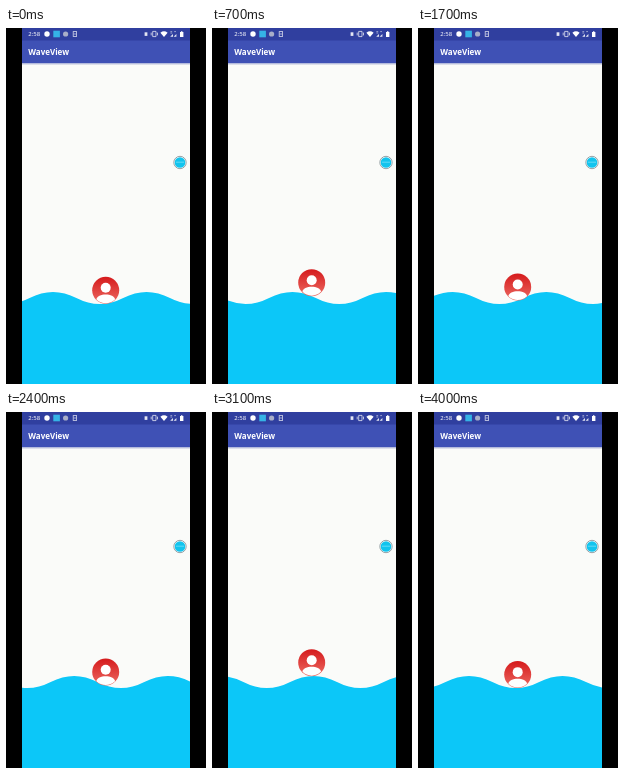
An HTML page that plays this animation: 200 px wide and 356 px high, repeating every 4.1 s.

```html
<!DOCTYPE html>
<html lang="en">
<head>
<meta charset="utf-8">
<title>WaveView</title>
<style>
  html, body { margin: 0; width: 100%; height: 100%; overflow: hidden; background: #000; }
  svg { display: block; width: 100%; height: 100%; }
  text { font-family: "Noto Sans", "Open Sans", sans-serif; fill: #fff; }
</style>
</head>
<body>
<svg viewBox="0 0 200 356">
  <defs>
    <linearGradient id="red" x1="0" y1="0" x2="0" y2="1">
      <stop offset="0" stop-color="#d51a1c"/>
      <stop offset="1" stop-color="#ec6a62"/>
    </linearGradient>
    <linearGradient id="shade" x1="0" y1="0" x2="0" y2="1">
      <stop offset="0" stop-color="#3f51b5" stop-opacity=".5"/>
      <stop offset="1" stop-color="#8088a8" stop-opacity="0"/>
    </linearGradient>
    <clipPath id="disc"><circle r="13"/></clipPath>
    <clipPath id="screen"><rect x="16" width="168" height="356"/></clipPath>
  </defs>

  <rect width="200" height="356"/>
  <g clip-path="url(#screen)">
    <rect x="16" width="168" height="356" fill="#fafbf9"/>
    <rect x="16" y="35" width="168" height="2.5" fill="url(#shade)"/>
    <rect x="16" y="12" width="168" height="23" fill="#3f51b5"/>
    <rect x="16" width="168" height="12.5" fill="#303f9f"/>
    <path id="wave" fill="#0cc7f8"/>
    <g id="avatar">
      <circle r="13.5" fill="url(#red)"/>
      <g clip-path="url(#disc)" fill="#fff">
        <circle cy="-2.4" r="5"/>
        <path d="M-9.5 14V9.5C-9 5.8-4.5 4.2 0 4.2S9 5.8 9.5 9.5V14Z"/>
      </g>
    </g>
  </g>

  <!-- floating button -->
  <g transform="translate(174 134.5)">
    <circle r="6.2" fill="#fff" stroke="#7d8a90" stroke-width=".8"/>
    <circle r="5.3" fill="#12c4ee"/>
    <path d="M-3.5-.3H3.5" stroke="#b4eefb" stroke-width="1" stroke-dasharray="1 1"/>
  </g>

  <!-- status bar -->
  <text x="22.3" y="8.4" font-size="6">2:58</text>
  <circle cx="41" cy="6" r="2.7" fill="#fff"/>
  <rect x="47.3" y="2.7" width="6.6" height="6.6" fill="#35b3e6"/>
  <circle cx="59.6" cy="6" r="2.6" fill="#a9aec8"/>
  <rect x="67.2" y="3.6" width="3.4" height="4.8" fill="none" stroke="#d5d8ea" stroke-width=".8"/>
  <path d="M67.5 6H70.3" stroke="#d5d8ea" stroke-width=".7"/>
  <rect x="138.6" y="4.3" width="2.8" height="3.6" fill="#e4e6f2"/>
  <path d="M146.7 3.4H150V8.6H146.7ZM145.2 4.6V7.4M151.5 4.6V7.4" fill="none" stroke="#e4e6f2" stroke-width=".8"/>
  <path d="M154.4 4.7Q158 1.9 161.6 4.7L158 9Z" fill="#fff"/>
  <path d="M164.2 8.8L167 6V8.8ZM167.6 8.8L170.4 6V8.8Z" fill="#e4e6f2"/>
  <path d="M164.4 3.6H166.2M164.4 5H166.2M168.2 3.6H170" stroke="#c6cae2" stroke-width=".7"/>
  <path d="M174 4H175V3.2H176.4V4H177.4V9H174Z" fill="#fff"/>

  <text x="22.3" y="27" font-size="8" font-weight="700">WaveView</text>
</svg>
<script>
  const LOOP = 4100, STEP = 100;
  const LEN = 93.6, HALF = LEN / 2, SPEED = 0.0478;
  const MID = 270, AMP = 6, CX = 99.7;
  const wave = document.getElementById('wave');
  const avatar = document.getElementById('avatar');
  const mod = (a, n) => ((a % n) + n) % n;

  // Every half wave is one parabola, as drawn by a quadratic curve.
  function heightAt(x, start) {
    const p = mod(x - start, LEN);
    const u = (p % HALF) / HALF;
    const bump = 4 * AMP * u * (1 - u);
    return p < HALF ? MID - bump : MID + bump;
  }

  function draw(t) {
    const start = mod(47 - HALF / 2 + SPEED * t, LEN) - LEN;
    let d = `M${start} ${MID}`;
    for (let i = 0; i < 6; i++) {
      const h = (i % 2 ? 2 : -2) * AMP;
      d += `q${HALF / 2} ${h} ${HALF} 0`;
    }
    wave.setAttribute('d', d + `V356H${start}Z`);
    avatar.setAttribute('transform', `translate(${CX} ${heightAt(CX, start) - 13.4})`);
  }

  let begin = null;
  function tick(now) {
    if (begin === null) begin = now;
    draw(Math.floor(((now - begin) % LOOP) / STEP) * STEP);
    requestAnimationFrame(tick);
  }
  draw(0);
  requestAnimationFrame(tick);
</script>
</body>
</html>
```
